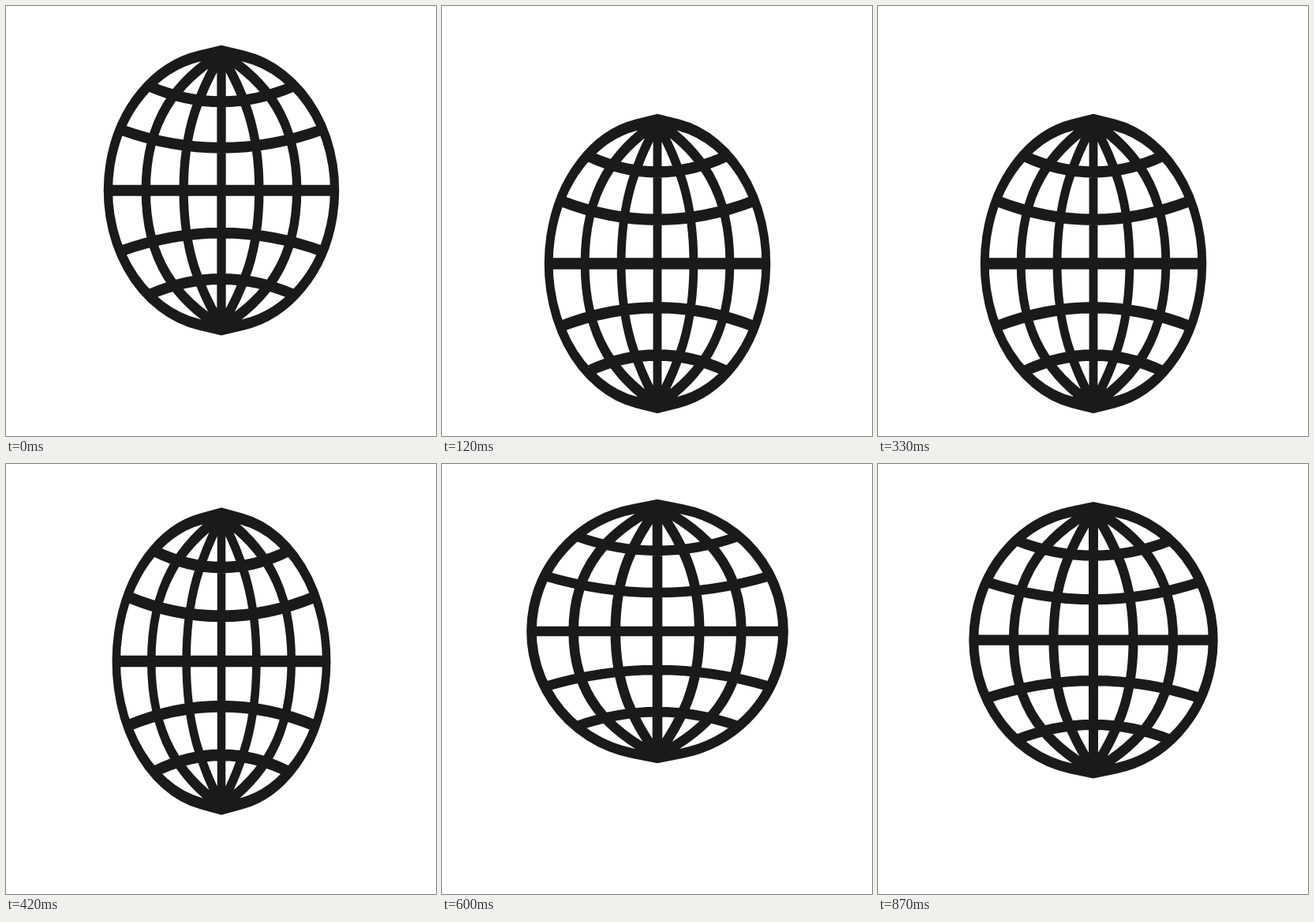
An HTML page with a canvas for the animation above (0.9 s loop, 545 px wide and 545 px high).

```html
<!DOCTYPE html>
<html lang="en">
<head>
<meta charset="utf-8">
<title>Bouncing globe</title>
<style>
  html, body { margin: 0; width: 100%; height: 100%; overflow: hidden; background: #fff; }
  canvas { display: block; width: 545px; height: 545px; }
</style>
</head>
<body>
<canvas id="stage" width="545" height="545"></canvas>
<script>
const ctx = document.getElementById('stage').getContext('2d');
const SIZE = 545, CENTER_X = 273, FLOOR = 524;
const STEP = 30, STEPS = 30, APEX = 22.5;
const RX = 159.7, RY = 157.6, LINE = 12.6;

// Fall from the apex to the floor: [steps since apex, centre y, stretch].
// The rise is the same path backwards.
const FALL = [
  [0, 211.8, 0], [2.5, 212, 0.001], [4.5, 214.5, 0.012], [6.5, 223.2, 0.05],
  [7.5, 233.7, 0.101], [8.5, 250, 0.166], [10, 286.5, 0.2], [11.5, 326.5, 0.137],
  [13, 361.5, 0.005], [14.5, 383.5, -0.127], [15, 385, -0.14]
];

function slope(i, col) {
  if (i === 0 || i === FALL.length - 1) return 0;
  const a = FALL[i - 1], b = FALL[i + 1];
  return (b[col] - a[col]) / (b[0] - a[0]);
}

// Cubic Hermite interpolation between the keys.
function along(d, col) {
  let i = 0;
  while (i < FALL.length - 2 && d > FALL[i + 1][0]) i++;
  const a = FALL[i], b = FALL[i + 1], h = b[0] - a[0];
  const u = (d - a[0]) / h, u2 = u * u, u3 = u2 * u;
  return a[col] * (2 * u3 - 3 * u2 + 1) + b[col] * (3 * u2 - 2 * u3) +
    h * (slope(i, col) * (u3 - 2 * u2 + u) + slope(i + 1, col) * (u3 - u2));
}

// Outer ring: an ellipse whose poles end in a shallow point.
function ring(path) {
  const tip = 11 * Math.PI / 180, pole = RY / Math.cos(tip), half = Math.PI / 2;
  path.moveTo(0, -pole);
  path.ellipse(0, 0, RX, RY, 0, -half + tip, half - tip);
  path.lineTo(0, pole);
  path.ellipse(0, 0, RX, RY, 0, half + tip, 3 * half - tip);
  path.closePath();
}

function meridian(path, x, x1, y1, y2) {
  for (const side of [-1, 1]) {
    path.moveTo(0, -RY);
    path.bezierCurveTo(side * x1, -y1, side * x, -y2, side * x, 0);
    path.bezierCurveTo(side * x, y2, side * x1, y1, 0, RY);
  }
}

function parallel(path, x, edge, middle) {
  for (const side of [-1, 1]) {
    path.moveTo(-x, side * edge);
    path.quadraticCurveTo(0, side * (2 * middle - edge), x, side * edge);
  }
}

const globe = new Path2D();
ring(globe);
meridian(globe, RX / 3, 25, 118, 80);
meridian(globe, RX * 2 / 3, 62, 126, 82);
parallel(globe, 102, 120, 102);
parallel(globe, 142, 70, 49);
globe.moveTo(0, -RY);
globe.lineTo(0, RY);
globe.moveTo(-RX, 0);
globe.lineTo(RX, 0);

function draw(now) {
  const step = Math.floor(now / STEP) % STEPS;
  const gap = Math.abs(step - APEX);
  const d = Math.min(gap, STEPS - gap);
  const stretch = along(d, 2);

  ctx.fillStyle = '#fff';
  ctx.fillRect(0, 0, SIZE, SIZE);
  ctx.save();
  ctx.beginPath();
  ctx.rect(0, 0, SIZE, FLOOR);
  ctx.clip();
  ctx.translate(CENTER_X, along(d, 1));
  ctx.scale(1 - stretch, 1 + stretch);
  ctx.lineWidth = LINE;
  ctx.lineJoin = 'miter';
  ctx.strokeStyle = '#1a1a1a';
  ctx.stroke(globe);
  ctx.restore();
}

const start = performance.now();
function tick() {
  draw(performance.now() - start);
  requestAnimationFrame(tick);
}
tick();
</script>
</body>
</html>
```
